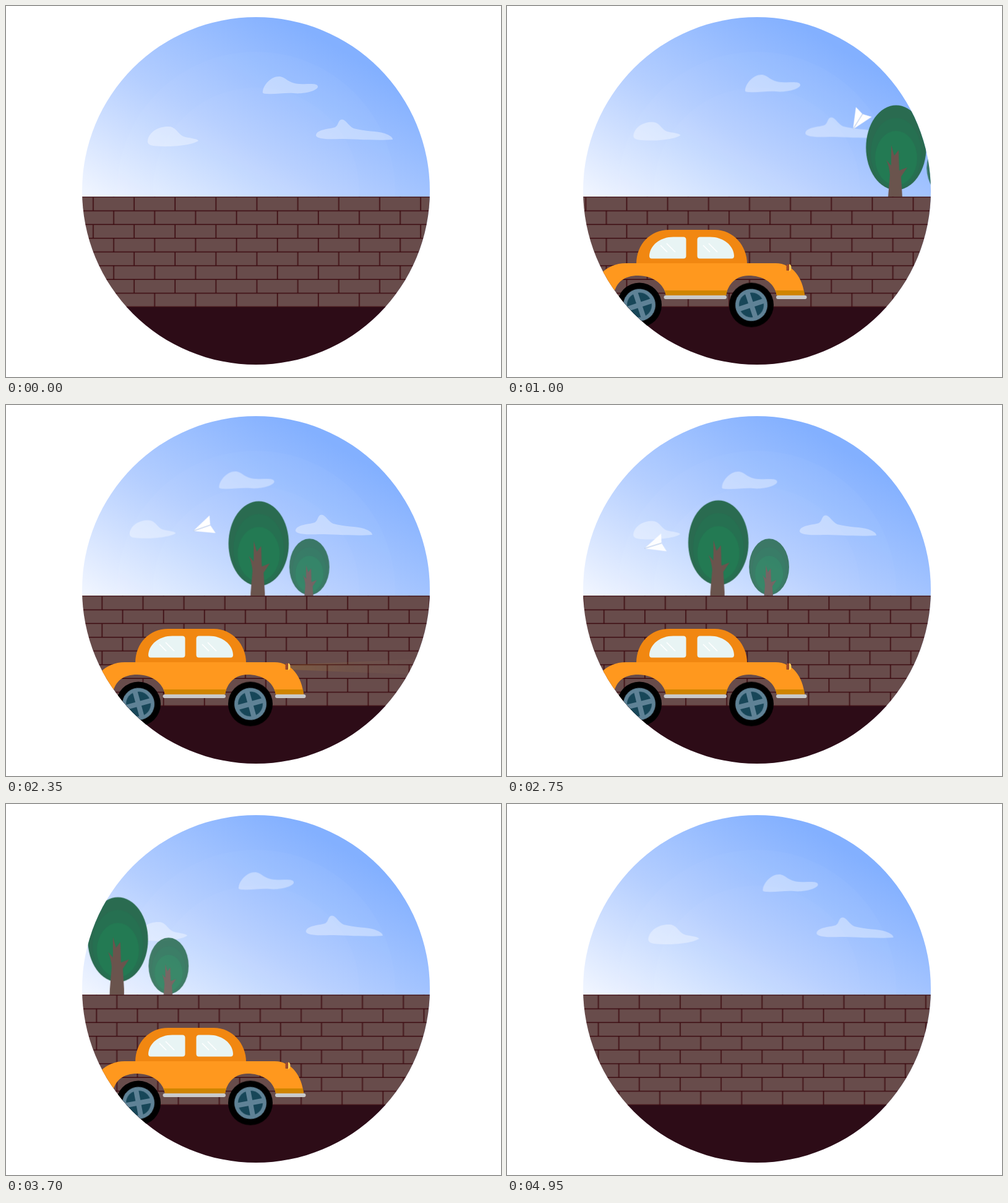
Animation of 800x600 px, one loop 5000 ms. Source, as an HTML page without scripts:

```html
<!DOCTYPE html>
<html lang="en">
<head>
<meta charset="utf-8">
<title>Car drive</title>
<style>
  html, body { margin: 0; width: 100%; height: 100%; overflow: hidden; background: #fff; }
  svg { display: block; width: 100%; height: 100%; }

  .wall, .trees, .rise, .cloud, .car, .wheel, .beam, .plane {
    animation: 5s linear infinite;
  }
  .wall { animation-name: wall; }
  .trees { animation-name: trees; }
  .rise { animation-name: rise; }
  .cloud.top { animation-name: cloud-top; }
  .cloud.left { animation-name: cloud-left; }
  .cloud.right { animation-name: cloud-right; }
  .car { animation-name: drive; }
  .wheel { animation-name: spin; }
  .beam { animation-name: beam; }
  .plane {
    animation-name: fly;
    offset-path: path("M640 20L612 90C600 125 588 153 570 182C552 211 522 237 486 237C430 237 385 175 322 197C270 215 220 240 158 240L110 240");
    offset-rotate: auto;
  }

  @keyframes wall {
    0% { transform: none; }
    20% { transform: translateX(-79.7px); }
    31% { transform: translateX(-120.3px); }
    47% { transform: translateX(-184.1px); }
    63% { transform: translateX(-247.6px); }
    84% { transform: translateX(-333.2px); }
    99% { transform: translateX(-390.2px); }
    100% { transform: translateX(-394px); }
  }
  @keyframes trees {
    0% { transform: translateX(797px); }
    20% { transform: translateX(629px); }
    31% { transform: translateX(542px); }
    47% { transform: translateX(408.5px); }
    63% { transform: translateX(275px); }
    84% { transform: translateX(95.5px); }
    100% { transform: translateX(-38px); }
  }
  @keyframes rise {
    from { transform: translateY(3.6px); }
    to { transform: translateY(-14.4px); }
  }
  @keyframes cloud-top {
    50% { transform: translate(-75px, -7px); }
  }
  @keyframes cloud-left {
    31% { transform: translate(-10.5px, 12.3px) scale(.88); }
  }
  @keyframes cloud-right {
    40% { transform: translate(-37.5px, -6.8px); }
  }
  @keyframes drive {
    0%, 2% { transform: translateX(-375px); animation-timing-function: ease-out; }
    19%, 79% { transform: none; animation-timing-function: ease-in; }
    98%, 100% { transform: translateX(560px); }
  }
  @keyframes spin {
    from { transform: rotate(-22deg); }
    to { transform: rotate(88deg); }
  }
  @keyframes beam {
    0%, 22% { opacity: 0; }
    31% { opacity: 1; }
    47% { opacity: .5; }
    54%, 100% { opacity: 0; }
  }
  @keyframes fly {
    0% { offset-distance: 0px; }
    9% { offset-distance: 75.4px; }
    20% { offset-distance: 177px; }
    31% { offset-distance: 281.8px; }
    47% { offset-distance: 454.8px; opacity: 1; }
    54% { opacity: 1; }
    63% { offset-distance: 625.7px; opacity: .45; }
    68%, 100% { offset-distance: 670px; opacity: 0; }
  }
</style>
</head>
<body>
<svg viewBox="0 0 800 600">
  <defs>
    <clipPath id="porthole"><circle cx="404" cy="299" r="281"/></clipPath>
    <linearGradient id="sky" gradientUnits="userSpaceOnUse" x1="130" y1="305" x2="335" y2="-49">
      <stop offset="0" stop-color="#f0f5ff"/>
      <stop offset=".5" stop-color="#b4ceff"/>
      <stop offset="1" stop-color="#83b0ff"/>
    </linearGradient>
    <linearGradient id="glow">
      <stop offset="0" stop-color="#e0a020" stop-opacity=".38"/>
      <stop offset=".45" stop-color="#c09040" stop-opacity=".2"/>
      <stop offset="1" stop-color="#c0a080" stop-opacity=".08"/>
    </linearGradient>
    <pattern id="bricks" patternUnits="userSpaceOnUse" x="121" y="297.9" width="66.15" height="44.4">
      <rect width="67" height="45" fill="#684c4b"/>
      <path d="M0 11.1H66.15M0 33.3H66.15M20 11.1V33.3M53.1 0V11.1M53.1 33.3V44.4" stroke="#3c0a10" stroke-width="1.6"/>
    </pattern>
    <g id="tree">
      <ellipse cy="-80" rx="48.7" ry="68.5" fill="#2a6b50"/>
      <ellipse cy="-71" rx="41" ry="57" fill="#267051"/>
      <ellipse cy="-63" rx="34" ry="44" fill="#237a53"/>
      <path fill="#6a544d" d="M-13 0L-10 -36Q-11 -50 -16 -60L-8 -51L-8 -84L-3 -67L4 -76L5 -43L18 -48L8 -33L10 0V30H-14Z"/>
    </g>
    <g id="wheel">
      <circle r="36"/>
      <g class="wheel">
        <circle r="26" fill="#5f8296"/>
        <circle r="20" fill="#174658"/>
        <path d="M-22 0H22M0 -22V22" stroke="#5f8296" stroke-width="8"/>
      </g>
    </g>
    <path id="body" d="M138 468C139 440 160 416 192 416H434C462 416 478 440 481 468H436C432 446 412 436 390 436C370 436 357 450 354 468H257C254 450 236 436 212 436C190 436 176 446 172 468Z"/>
    <clipPath id="sill"><rect x="130" y="460" width="360" height="9"/></clipPath>
  </defs>

  <g clip-path="url(#porthole)">
    <rect width="800" height="600" fill="url(#sky)"/>
    <g fill="#fff" fill-opacity=".025">
      <circle cx="404" cy="299" r="225"/>
      <circle cx="404" cy="299" r="167"/>
    </g>

    <g fill="#fff" fill-opacity=".38">
      <path class="cloud top" d="M415 138C416 128 428 114 441 114C452 114 455 125 474 126C490 127 502 124 504 130C505 137 480 143 465 141C450 140 435 143 422 142C416 142 414 141 415 138Z"/>
      <path class="cloud left" d="M229 217C232 203 247 194 264 195C276 196 278 209 290 212C300 214 310 215 311 218C300 226 260 229 238 226C231 225 228 222 229 217Z"/>
      <path class="cloud right" d="M501 209C502 199 524 199 532 196C538 193 536 184 543 183.5C550 184 553 194 562 198C580 203 600 202 612 206C620 209 625 212 625 216C600 218 560 215 540 215C520 216 501 215 501 209Z"/>
    </g>

    <g class="trees">
      <use href="#tree" transform="translate(82 315) scale(.665)" opacity=".87"/>
      <g class="rise"><use href="#tree" y="309"/></g>
    </g>

    <g class="plane">
      <path d="M20 0L-13 -15L-9 0L-13 15Z" fill="#fff"/>
      <path d="M20 0L-9 0" stroke="#a9bfe6" stroke-width="1"/>
    </g>

    <rect class="wall" x="100" y="308.3" width="1100" height="180" fill="url(#bricks)"/>
    <rect y="487" width="800" height="113" fill="#2d0c17"/>

    <g class="car">
      <path class="beam" d="M459 420L662 411V436L459 428Z" fill="url(#glow)"/>
      <path d="M209 417C209 385 232 362 262 362H336C366 362 388 388 388 417Z" fill="#f18711"/>
      <use href="#body" fill="#ff981e"/>
      <use href="#body" fill="#cf8500" clip-path="url(#sill)"/>
      <g id="window">
        <path d="M230 404C231 387 247 373.5 269 373.5H285Q289.5 373.5 289.5 378V404Q289.5 408.5 285 408.5H234Q230 408.5 230 404Z" fill="#e8f4f4"/>
      </g>
      <use href="#window" transform="translate(597 0) scale(-1 1)"/>
      <path d="M248 387L259 398M258 384L272 398M317 387L328 398M326 384L340 398" stroke="#fff" stroke-width="1.6"/>
      <path d="M138 471H170M256.500 471H352M438 471H481.500" stroke="#cacaca" stroke-width="6" stroke-linecap="round"/>
      <rect x="451.500" y="418" width="4.500" height="10" rx="1" fill="#9c4a2c"/>
      <path d="M456 417.500Q459.500 418 459.500 423Q459.500 428 456 429Z" fill="#ffcf5a"/>
      <use href="#wheel" x="214" y="483.500"/>
      <use href="#wheel" x="395" y="483.500"/>
    </g>
  </g>
</svg>
</body>
</html>
```
